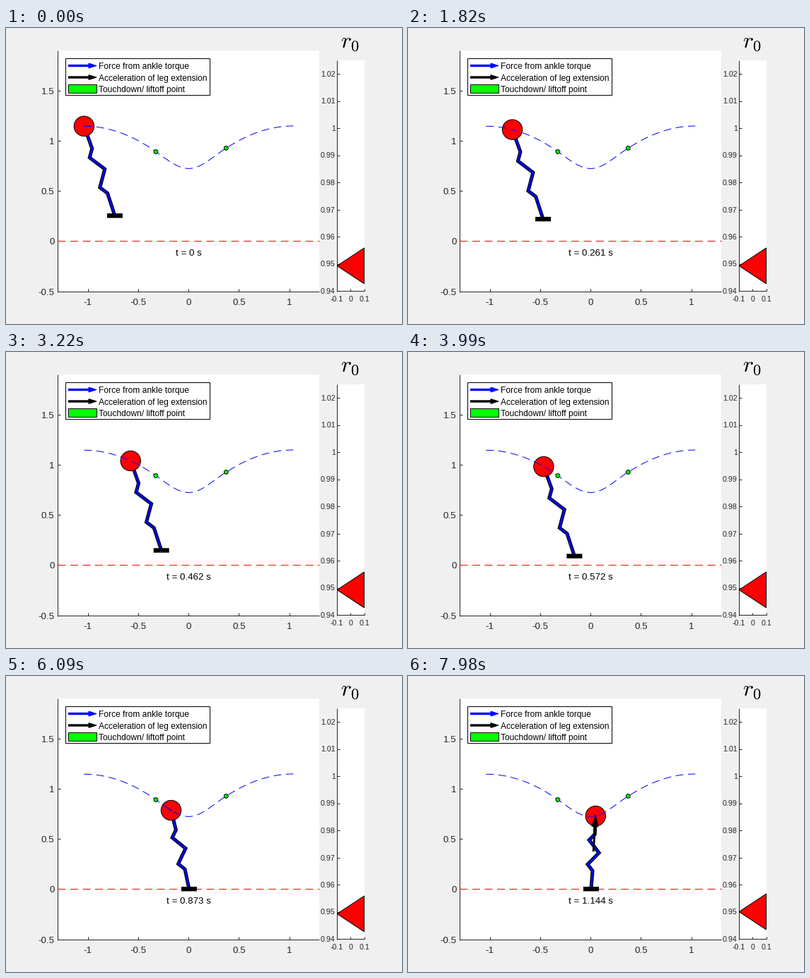
Recreate the animation shown at these times as a matplotlib script. Size 560 px wide and 420 px high, loop 8 s.

```python
import numpy as np
import matplotlib
import matplotlib.pyplot as plt
from matplotlib.animation import FuncAnimation
from matplotlib.patches import Circle, Polygon, Rectangle

matplotlib.rcParams["font.family"] = "Liberation Sans"
matplotlib.rcParams["mathtext.fontset"] = "cm"

PX = 0.9                    # points per pixel at 80 dpi
INK = "#262626"
UNIT = 142.5                # pixels per metre
X0, Y0 = 258.2, 302.45      # pixel position of the world origin
STEP_MS, FRAMES, HOLD_MS = 40, 200, 70
DT = 0.010035               # simulated seconds per pose
T_DOWN, T_LOW, T_UP, T_END = 0.712, 1.085, 1.5, 2.165

fig = plt.figure(figsize=(7, 5.25), dpi=80, facecolor="#f0f0f0")
ax = fig.add_axes([0, 0, 1, 1])
ax.set_xlim(0, 560)
ax.set_ylim(420, 0)
ax.axis("off")


def line(xs, ys, color=INK, width=1, z=2, **kw):
    kw.setdefault("solid_capstyle", "butt")
    return ax.plot(xs, ys, color=color, lw=width * PX, zorder=z, **kw)[0]


def label(x, y, s, size, ha="center", color=INK):
    return ax.text(x, y, s, fontsize=size * PX, ha=ha, va="baseline",
                   color=color, zorder=12)


def shape(points, fill, edge="black", width=1, z=3):
    return ax.add_patch(Polygon(points, closed=True, fc=fill, ec=edge,
                                lw=width * PX, zorder=z, joinstyle="miter"))


def box(x, y, w, h, fill, edge="none", z=1):
    return ax.add_patch(Rectangle((x, y), w, h, fc=fill, ec=edge,
                                  lw=PX, zorder=z))


def body(t):
    """Pixel position of the hopping mass at time t."""
    if t < T_DOWN:
        return 110.4 + UNIT * t, 139.3 + UNIT * t * t / 2
    if t > T_UP:
        left = T_END - t
        return 406.3 - UNIT * left, 139 + UNIT * left * left / 2
    s = t - T_LOW
    a, b = (208.3, 262) if s < 0 else (222.6, 315)
    return 258.5 + 115 * s + 71 * s**3, 199.4 - a * s**2 + b * s**4


def leg_points(hip, foot):
    hip, foot = np.array(hip), np.array(foot)
    u = (foot - hip) / np.hypot(*(foot - hip))
    side = np.array([u[1], -u[0]])
    along = [0, 1 / 4, 1 / 3, 1 / 2, 2 / 3, 3 / 4, 1]
    off = [0, 0.5, -7, 8, -7, 0.5, 0]
    return np.array([hip + (foot - hip) * k + side * d
                     for k, d in zip(along, off)])


def arrow_head(tip, tail, length, half):
    tip, tail = np.array(tip), np.array(tail)
    u = (tip - tail) / np.hypot(*(tip - tail))
    side = np.array([-u[1], u[0]])
    base = tip - u * length
    return np.array([tip, base + side * half, base - side * half])


# main plot
box(73, 32, 370, 342, "white")
line([73, 73], [32, 374.5])
line([73, 443], [374, 374])
for v in (-1, -0.5, 0, 0.5, 1):
    x = X0 + UNIT * v
    line([x, x], [374, 370])
    label(x, 393, f"{v:g}", 13.33)
for v in (-0.5, 0, 0.5, 1, 1.5):
    y = Y0 - UNIT * v
    line([73, 77], [y, y])
    label(68.5, round(y + 5), f"{v:g}", 13.33, "right")
line([73, 443], [Y0, Y0], "red", z=2, linestyle=(0, (11, 6.5)))

# narrow plot on the right
box(468, 46, 39, 328, "white")
line([468, 468], [46, 374])
line([468, 507], [373, 373])
for i in range(9):
    y = 373.4 - 38.5 * i
    line([468, 472], [y, y])
    label(465.6, round(y + 3.6), f"{0.94 + 0.01 * i:.4g}", 10.67, "right")
for x, s in ((468, "-0.1"), (487.3, "0"), (506.5, "0.1")):
    line([x, x], [373, 369.5])
    label(x, 388, s, 10.67)
label(486.8, 28, "$r_0$", 32, color="black")

# legend
box(84, 43, 204, 52, "white", "black", z=9)
for y, color, s in ((53.5, "blue", "Force from ankle torque"),
                    (70, "black", "Acceleration of leg extension"),
                    (86.5, "#00ff00", "Touchdown/ liftoff point")):
    label(131, round(y + 4.6), s, 12, "left", "black")
    if color == "#00ff00":
        box(88, 80, 40, 12, color, "black", z=10)
    else:
        line([88, 119], [y, y], color, 3.4, z=10, snap=False)
        shape(arrow_head((128, y), (88, y), 11, 3.4), color, color, 1, z=10)

# path of the mass and the contact points
path = np.array([body(t) for t in np.linspace(0, T_END, 300)])
line(path[:, 0], path[:, 1], "blue", z=7, linestyle=(0, (11, 6.5)))
for t in (T_DOWN, T_UP):
    ax.add_patch(Circle(body(t), 2.9, fc="#00ff00", ec="black",
                        lw=PX, zorder=8))

# moving parts
leg_style = dict(solid_joinstyle="miter")
leg_edge = line([], [], "black", 5, z=3, **leg_style)
leg_core = line([], [], "blue", 2.8, z=3.5, **leg_style)
sole = box(0, 0, 22, 6.4, "black", z=4)
sole.set_snap(False)
ball = ax.add_patch(Circle((0, 0), 14.2, fc="red", ec="black",
                           lw=PX, zorder=5))
torque = shape(np.zeros((3, 2)), "blue", "blue", 0.6, z=6)
push = line([], [], "black", 3, z=10)
push_head = shape(np.zeros((3, 2)), "black", z=10)
marker = shape(np.zeros((3, 2)), "red", z=3)
clock = label(258.5, 323, "", 13.33, color="black")


def draw(n):
    t = (n * STEP_MS + 30) // HOLD_MS * DT
    x, y = body(t)
    stance = t >= T_DOWN
    foot = (258.9, 302.2) if stance else (x + 43.5, y + 127)

    pts = leg_points((x, y), foot)
    leg_edge.set_data(pts[:, 0], pts[:, 1])
    leg_core.set_data(pts[:, 0], pts[:, 1])
    sole.set_xy((foot[0] - 11, foot[1] - 3.2))
    ball.center = (x, y)

    torque.set_visible(stance)
    torque.set_xy(arrow_head((x + 1.5, y + 0.5), (x - 1, y - 0.5), 3, 1.2))

    late = max(t - T_LOW, 0)
    push.set_visible(late > 0)
    push_head.set_visible(late > 0)
    u = (np.array(foot) - (x, y)) / np.hypot(foot[0] - x, foot[1] - y)
    tail = np.array((x, y)) + 50.5 * u
    neck = np.array((x, y)) + 10 * u
    push.set_data([tail[0], neck[0]], [tail[1], neck[1]])
    push_head.set_xy(arrow_head((x, y), tail, 15, 4.5))

    my = 337.5 - 860 * late**2
    marker.set_xy([(468.2, my), (506.5, my - 25.4), (506.5, my + 25.4)])
    clock.set_text(f"t = {round(t, 3):g} s")
    return leg_edge, leg_core, sole, ball, torque, push, push_head, marker, clock


anim = FuncAnimation(fig, draw, frames=FRAMES, interval=STEP_MS,
                     init_func=lambda: draw(0), repeat=True, repeat_delay=0,
                     blit=False)
plt.show()
```
